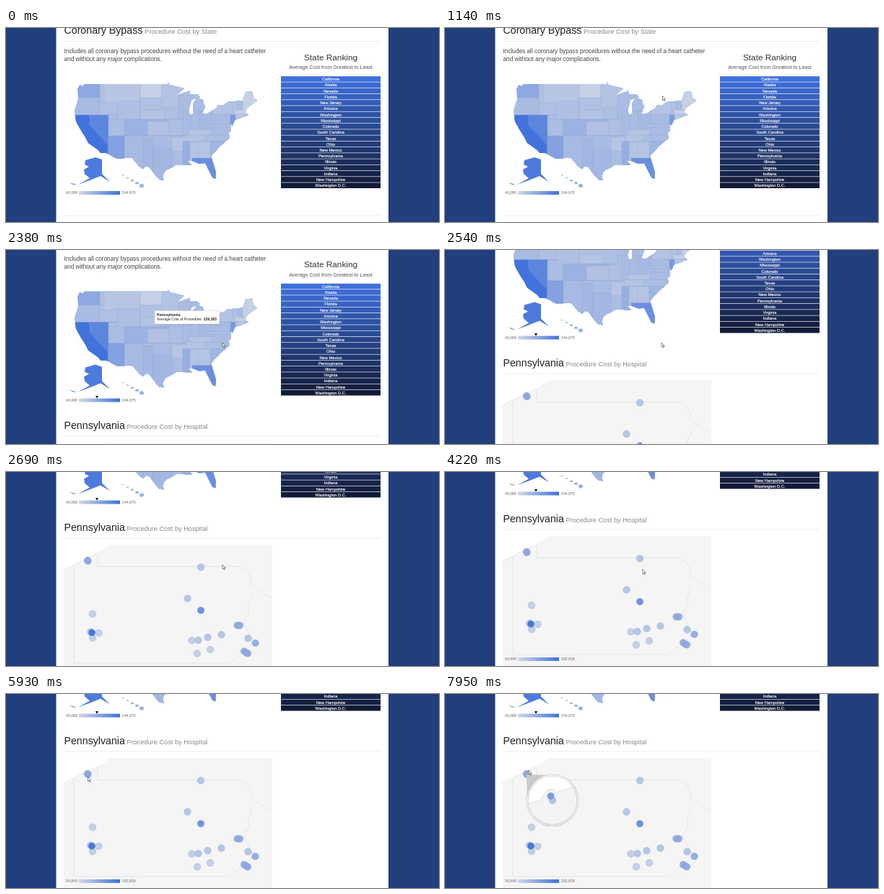
Animation, 600 px wide and 270 px high, one loop 8 s. Source, as an HTML page:

```html
<!DOCTYPE html>
<html lang="en">
<head>
<meta charset="utf-8">
<title>Procedure Cost by State</title>
<style>
  html, body { margin: 0; height: 100%; overflow: hidden; background: #213f7d; }
  svg { display: block; width: 600px; height: 270px; font-family: "Liberation Sans", Arial, sans-serif; }
  .title { font-size: 14.2px; fill: #222; }
  .sub { font-size: 9.2px; fill: #888; }
  .body { font-size: 8.26px; fill: #444; }
  .row { font-size: 5.7px; fill: #fff; stroke: #fff; stroke-width: .15; text-anchor: middle; }
  .small { font-size: 5.2px; fill: #666; }
  .tip { font-size: 5.1px; fill: #222; }
  .line { fill: none; stroke: #dce0dc; stroke-width: .7; }
  .rule { stroke: #eee; }
</style>
</head>
<body>
<svg viewBox="0 0 600 270">
  <defs>
    <linearGradient id="scale"><stop stop-color="#d2d8e5"/><stop offset="1" stop-color="#3e70dc"/></linearGradient>
    <clipPath id="us">
      <path d="M102 79L107 81 108 78H225V195L219 201 217 207 219 212 213 211 208 206 199 194 194 192 190 196 185 193 175 181H164V182H154L139 174H131L128 170 114 160 110 152 103 141 97 130 95 115 100 99 99 85z"/>
      <path d="M224 78V75L227 79 247 84 236 94 255 87 254 92 265 92 269 96 257 100 253 115 255 121 260 119 259 105 265 97 273 100 274 106 276 109 272 119 278 120 292 111 293 108 302 107 307 103 328 101 332 89 341 88 343 97 348 101 334 111 331 117 336 121 317 128 314 136 311 133 312 143 308 147 306 138 310 153 297 164 284 178 291 201 290 210 286 208 276 188 268 189 258 185 252 185 258 191 237 190 224 197z"/>
    </clipPath>
    <clipPath id="glass"><circle cx="149" cy="148" r="35"/></clipPath>
  </defs>
  <path fill="#fff" d="M69.5 0H530V270H69.5z"/>

  <g id="page">
    <text class="title" x="80.5" y="8.3">Coronary Bypass <tspan class="sub" x="192">Procedure Cost by State</tspan></text>
    <path class="rule" d="M80 18.500H519"/>
    <text class="body" x="80.5" y="35">Includes all coronary bypass procedures without the need of a heart catheter</text>
    <text class="body" x="80.5" y="46">and without any major complications.</text>
    <text x="450" y="44.7" font-size="11.8" fill="#333" text-anchor="middle">State Ranking</text>
    <text x="450" y="57" font-size="7.12" fill="#555" text-anchor="middle">Average Cost from Greatest to Least</text>
    <g id="rows"></g>

    <g clip-path="url(#us)" stroke="#8ea3d0" stroke-width=".35">
      <g id="states"></g>
      <path id="california" d="M90 121H116V135L141 162V182H90z"/>
    </g>
    <path id="alaska" d="M110 184L124 180 133 183V203L144 214 131 206 121 210 100 218 116 209 109 203 108 197 115 193 109 190zM88 215l6 2 4 1-5 0z"/>
    <g id="hawaii" fill="#9eb3e2"></g>

    <g id="usKey"></g>
    <path id="mark" d="M124 223.500h4l-2 3.500z"/>
    <path id="emptyRule" class="rule" d="M80 261H519"/>

    <g id="detail" transform="translate(0 199.5)">
      <text class="title" x="80.5" y="70.2">Pennsylvania <tspan class="sub" x="167.5">Procedure Cost by Hospital</tspan></text>
      <path class="rule" d="M80 80H519"/>
      <path fill="#f5f5f5" d="M80 124L108 110 127 101 144 89.500H369V290H80z"/>
      <path class="line" d="M80 124L108 110 127 101V119.500H325L336 128 341 139 338 143 353 154 368 163M94 118V254H310L340 229 342 224 329 198 337 184 335 176 341 161"/>
      <g id="dots" stroke="#8ea3d0" stroke-width=".4"></g>
      <g id="paKey"></g>
      <g id="lens">
        <path fill="#c9c9c9" d="M113 112L149 113 114 148z"/>
        <circle cx="149" cy="148" r="35" fill="#f3f3f3"/>
        <path clip-path="url(#glass)" fill="#fff" stroke="#dce0dc" d="M110 154L131 148 142 134 151 132 152 138 190 124V110H110z"/>
        <g id="lensDots" stroke="#8ea3d0" stroke-width=".4"></g>
        <g fill="none">
          <circle cx="149" cy="148" r="35" stroke="#aaa" stroke-width="2.6"/>
          <circle cx="149" cy="148" r="35" stroke="#fff" stroke-width="1.5"/>
        </g>
      </g>
    </g>

    <g id="tip">
      <path fill="#000" opacity=".1" d="M1 1H91V20H1z"/>
      <path fill="#fff" stroke="#ccc" stroke-width=".6" d="M0 0H90V18.500H0z"/>
      <text class="tip" x="3" y="7" font-weight="bold">Pennsylvania</text>
      <text class="tip" x="3" y="13.5">Average Cost of Procedure: <tspan x="67.5" font-weight="bold">129,363</tspan></text>
    </g>
  </g>
  <path id="cursor" fill="#fff" stroke="#333" stroke-width=".6" d="M0 0V6l1.400-1.200 1 2.200 1-.4-1-2.200h1.800z"/>
</svg>

<script>
const $ = id => document.getElementById(id);
const fill = (id, items, make) => $(id).innerHTML = items.map(make).join("");
const mix = (a, b, k) => `rgb(${a.map((v, i) => Math.round(v + (b[i] - v) * k))})`;
const shade = k => mix([207, 214, 229], [62, 112, 220], k);

const ranking = {
  CA: "California", AK: "Alaska", NV: "Nevada", FL: "Florida", NJ: "New Jersey", AZ: "Arizona",
  WA: "Washington", MS: "Mississippi", CO: "Colorado", SC: "South Carolina", TX: "Texas", OH: "Ohio",
  NM: "New Mexico", PA: "Pennsylvania", IL: "Illinois", VA: "Virginia", IN: "Indiana",
  NH: "New Hampshire", DC: "Washington D.C."
};
fill("rows", Object.values(ranking), (name, i) => {
  const y = 67.2 + i * 8.23;
  return `<rect x="381" y="${y}" width="138" height="7.6" fill="${mix([62, 112, 220], [17, 26, 56], i / 18)}"/>
    <text class="row" x="450" y="${y + 6}">${name}</text>`;
});

// Cost falls off with rank; unranked states get a low cost seeded by their letters.
function cost(code) {
  const rank = Object.keys(ranking).indexOf(code);
  if (rank >= 0) return .25 + .72 * Math.exp(-((rank / 5) ** 1.4));
  if ("ND ME MD MA".includes(code)) return .06;
  return .15 + (code.charCodeAt(0) * 7 + code.charCodeAt(1) * 3) % 10 * .013;
}

// Each state fills everything right of and below its corner; later ones paint over it.
const corners = `WA 90 70, OR 90 97, ID 130 70, MT 136 70, ID 130 104, CA 90 121, NV 116 121,
  UT 142 121, WY 154 102, ND 186 70, SD 186 97, MN 216 70, NE 186 114, IA 220 110, WI 239 90,
  MI 255 86, UT 142 127, CO 164 127, KS 196 130, MO 226 127, IL 245 115, IN 256 118, OH 267 116,
  NY 286 95, VT 314 98, NH 321 95, ME 328 80, MA 317 114, PA 285 120, NJ 311 121, CT 318 120,
  MD 290 134, WV 280 134, KY 253 141, VA 284 138, AZ 142 150, NM 164 150, OK 190 150, TX 190 154,
  OK 204 150, TX 204 167, AR 230 152, LA 231 171, TN 249 149, NC 275 149, MS 245 158, AL 255 158,
  GA 267 158, SC 283 158, FL 258 181`;
fill("states", corners.split(","), item => {
  const [code, x, y] = item.trim().split(" ");
  return `<path d="M${x} ${y}H350V215H${x}z" fill="${shade(cost(code))}"/>`;
});
$("california").setAttribute("fill", shade(cost("CA")));
$("alaska").setAttribute("fill", shade(cost("AK")));
fill("hawaii", [0, 1, 2, 3, 4], i =>
  `<ellipse cx="${162 + 6.5 * i}" cy="${205 + 3.6 * i}" rx="${1.4 + i * .4}" ry="${.7 + i * i * .12}"/>`);

const key = (y, low, high) => `<rect x="101" y="${y}" width="57" height="5" fill="url(#scale)"/>
  <text class="small" x="83" y="${y + 4.2}">${low}</text><text class="small" x="161" y="${y + 4.2}">${high}</text>`;
$("usKey").innerHTML = key(227, "40,068", "244,975");
$("paKey").innerHTML = key(258, "54,849", "262,818");

const dots = (k, places) => places.split(" ").map(p => {
  const [x, y] = p.split(",");
  return `<circle cx="${x}" cy="${y}" r="4.8" fill="${shade(k)}" fill-opacity=".93"/>`;
}).join("");
$("dots").innerHTML =
  dots(.1, "120,185.5 117,210.5 120,219 128.5,212 257.5,222.5 283,235 265,240.5") +
  dots(.2, "270,120.5 251.5,164 266.5,222 279.5,218 298.5,214.5 335.5,219.5") +
  dots(.45, "113,111 113.5,112 324,201.5 320.5,201.5 345.5,226 330,237.5 333,239.5 335,240.5") +
  dots(.75, "270,180.5") + dots(1, "119,211.5");
$("lensDots").innerHTML = dots(.25, "149,148") + dots(.62, "146.5,142");

// Cursor moves: start, end, x, y
const moves = [
  [380, 900, 278, 69], [900, 1220, 318, 113], [1220, 1680, 301, 128], [1850, 1910, 300, 129],
  [3220, 3840, 291, 130], [4070, 4850, 122, 186], [5150, 5930, 113.5, 115.5],
  [5930, 6470, 112.5, 112], [7340, 7950, 116, 106]
];
const ease = (t, start, end) =>
  (1 - Math.cos(Math.PI * Math.min(1, Math.max(0, (t - start) / (end - start))))) / 2;
const show = (id, on) => $(id).setAttribute("visibility", on ? "visible" : "hidden");
const move = (id, x, y) => $(id).setAttribute("transform", `translate(${x} ${y})`);

const tick = 1000 / 13;  // the screen refreshes 13 times a second
function draw(now) {
  const t = Math.floor(now % 8000 / tick + .15) * tick;
  let x = 488, y = 219;
  for (const [start, end, toX, toY] of moves) {
    const k = ease(t, start, end);
    x += (toX - x) * k;
    y += (toY - y) * k;
  }
  move("cursor", x, y);
  move("tip", x - 94, y - 24);
  move("page", 0, -199.5 * ease(t, 2284, 2769));
  show("cursor", t >= 380);
  show("tip", t >= 1450 && t < 2500);
  show("mark", t >= 1450);
  show("emptyRule", t < 2300);
  show("detail", t >= 2300);
  show("lens", t >= 6220);
  requestAnimationFrame(draw);
}
requestAnimationFrame(draw);
</script>
</body>
</html>
```
